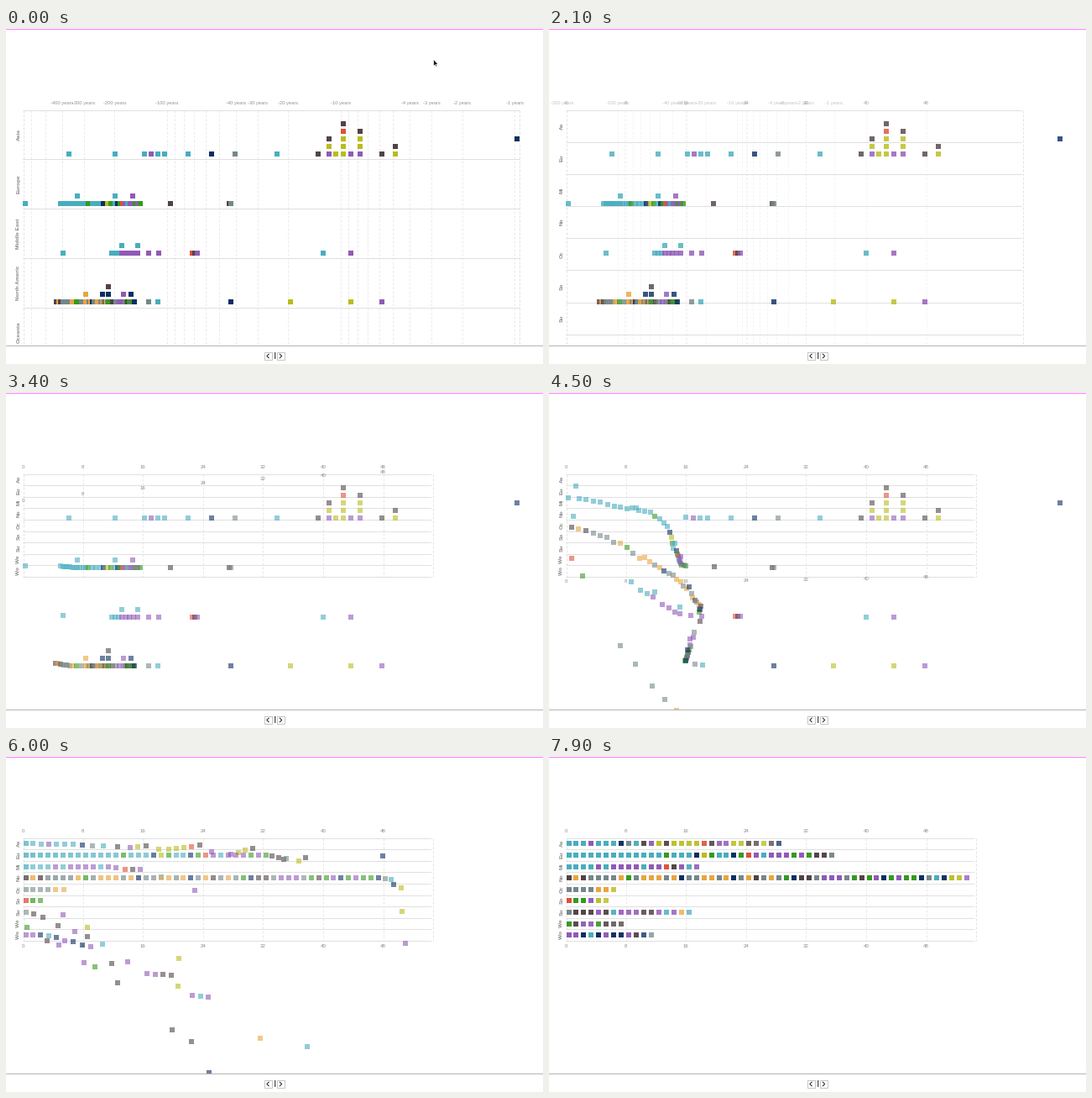
These frames come from a looping animation (640x400 px, 8 s). A matplotlib script:

```python
import matplotlib.pyplot as plt
import numpy as np
from matplotlib.animation import FuncAnimation
from matplotlib.collections import LineCollection
from matplotlib.colors import to_rgb
from matplotlib.patches import Polygon, Rectangle

W, H, DPI = 640, 400, 100
FRAMES, STEP = 80, 100
PX = 72 / DPI

AXIS_START, DUR = 1130, 2000
MOVE_START, SPREAD = 3050, 1975
LEFT, TOP, CLIP = 20, 97.5, 378
OLD_ROW, NEW_ROW = 58.8, 13.6
DECADE, UNIT = 207.2, 8.95

plt.rcParams["font.family"] = "Liberation Sans"

PALETTE = dict(t="#48adbe", p="#9059b8", n="#0b2e62", g="#75878a", d="#514345",
               y="#b9bc1c", o="#e8a53f", r="#e04e39", e="#35991f")

# label, item colours from oldest to newest, key points {item: x on the log axis}
ROWS = [
    ("Asia", "tttptttngtdpydyyyyrdppyyddydn",
     {0: 75, 1: 130, 2: 165, 5: 189, 8: 273, 10: 372, 11: 385, 13: 385, 15: 402,
      19: 402, 21: 422, 24: 422, 26: 464, 27: 464, 28: 609}),
    ("Europe", "t" * 13 + "etttnyettnerptpppepeddg",
     {0: 23, 1: 65, 8: 85, 9: 85, 13: 98, 20: 130, 21: 130, 28: 151, 29: 151,
      32: 160, 33: 196, 34: 266, 35: 268}),
    ("Middle East", "ttttptpppptpprdptp",
     {0: 68, 1: 126, 4: 138, 5: 138, 9: 157, 10: 157, 12: 182, 13: 222, 15: 228,
      16: 378, 17: 411}),
    ("North Americ", "dodggggoegooogonggoogongodgogenddgpppgedepnepeengtnyyp",
     {0: 60, 7: 79, 10: 95, 11: 95, 21: 115, 22: 115, 29: 122, 31: 122, 35: 140,
      36: 140, 41: 149, 42: 149, 47: 153, 48: 170, 49: 181, 50: 268, 52: 411,
      53: 448}),
    ("Oceania", "ggggooy", {0: 121, 2: 138, 5: 163, 6: 435}),
    ("South Americ", "reepyy", {0: 61, 1: 75, 2: 149, 3: 331, 5: 434}),
    ("Sub-Tropics", "gdddpdtpppddptpot",
     {0: 144, 2: 200, 4: 366, 8: 411, 11: 411, 12: 422, 14: 422, 15: 464, 16: 546}),
    ("West Asia", "edppeddd", {0: 185, 1: 325, 3: 385, 5: 402, 7: 434}),
    ("World", "ppntnpnnpdng", {0: 128, 2: 142, 8: 251, 9: 370, 11: 500}),
]


def ease(u):
    """Cubic in-out."""
    u = np.clip(u, 0, 1)
    return np.where(u < .5, 4 * u ** 3, 1 - 4 * (1 - u) ** 3)


def mix(a, b, k):
    return a + (b - a) * k


def log_x(years, right=606):
    return right - DECADE * np.log10(years)


def build_items():
    """Items of equal age stack up; the newest ones sit two levels higher."""
    start, end, rgb = [], [], []
    for row, (_, colors, keys) in enumerate(ROWS):
        xs = np.interp(range(len(colors)), list(keys), list(keys.values()))
        ages = np.round(10 ** ((609 - xs) / DECADE))
        for col, (c, age) in enumerate(zip(colors, ages)):
            level = np.sum(ages[:col] == age) + 2 * (age == 1)
            start.append((log_x(age, 609), 150 + OLD_ROW * row - 9 * level))
            end.append((23.5 + UNIT * col, 104.4 + NEW_ROW * row))
            rgb.append(to_rgb(PALETTE[c]))
    return np.array(start), np.array(end), np.array(rgb)


start, end, rgb = build_items()
rank = np.argsort(np.argsort(start[:, 0], kind="stable"))
delay = MOVE_START + SPREAD * rank / len(start)

fig = plt.figure(figsize=(W / DPI, H / DPI), dpi=DPI, facecolor="white")
ax = fig.add_axes([0, 0, 1, 1])
ax.set(xlim=(0, W), ylim=(H, 0))
ax.axis("off")


def label(x, y, s, size, color, **kw):
    return ax.text(x, y, s, fontsize=size * PX, color=color, ha="center",
                   va="center", clip_on=True, **kw)


def lines(color, style="solid", z=1):
    c = LineCollection([], colors=color, linewidths=PX, linestyles=style, zorder=z)
    ax.add_collection(c)
    return c


def vline(x, y0, y1):
    return [(x, y0), (x, y1)]


def hline(y, x0, x1):
    return [(x0, y), (x1, y)]


DASH = (0, (3, 2))

# log axis that collapses into a linear one
years = np.array([m * d for d in (1, 10, 100) for m in range(1, 10) if m * d <= 600])
old_x = log_x(years)
old_end = 23.5 - .72 * years
old_grid = lines("#ebebeb", DASH)
old_labels = [(i, label(0, 89.5, f"-{v} years", 5.8, "#929292"))
              for i, v in enumerate(years) if str(v)[0] in "1234"]

# linear count axis
counts = np.arange(0, 49, 8)
new_x = LEFT + UNIT * counts
new_grid = lines("#e8e8e8", DASH)
top_labels, low_labels = [
    [label(x, 89.5, str(n), 6.2, "#8c8c8c") for x, n in zip(new_x, counts)]
    for _ in range(2)]

frame_lines = lines("#e3e3e3", DASH)
row_lines = lines("#e0e0e0")
row_labels = [label(15, 0, "", 6.5, "#888888", rotation=90, weight="bold")
              for _ in ROWS]

squares = ax.scatter(start[:, 0], start[:, 1], s=(6 * PX) ** 2, marker="s",
                     linewidths=0, zorder=3)

# footer
ax.add_patch(Rectangle((0, CLIP), W, H - CLIP, fc="white", ec="none", zorder=5))
ax.plot([0, W], [377.5, 377.5], color="#b4b4b4", lw=PX, zorder=6)
for cx, d in ((312, 1), (327.5, -1)):
    ax.add_patch(Rectangle((cx - 4.5, 386), 9, 9, fc="white", ec="#c6c6c6",
                           lw=PX, zorder=6))
    ax.plot([cx + 1.2 * d, cx - 1.2 * d, cx + 1.2 * d], [388.2, 390.5, 392.8],
            color="#222222", lw=PX, zorder=7)
for x, c in ((319.5, "#555555"), (321, "#c0c0c0")):
    ax.plot([x, x], [385.5, 393], color=c, lw=PX, zorder=7)
ax.plot([0, W], [0.5, 0.5], color="#f979f4", lw=PX, zorder=7)

# tops of a text line that peeks in at the lower edge
cut_text = lines("#333333", (0, (2, 1.5)), z=7)
cut_text.set_segments([hline(399.5, a, b) for a, b in
                       ((18, 23), (64, 82), (97, 127), (134, 155), (385, 407))])

arrow = np.array([(0, 0), (0, 7.2), (1.6, 5.8), (2.7, 8.2), (3.7, 7.7),
                  (2.7, 5.4), (4.8, 5.2)])
cursor = ax.add_patch(Polygon(arrow + (509.8, 37.8), fc="#111111", ec="white",
                              lw=.4 * PX, zorder=8))


def draw_axes(t, k):
    row_h = mix(OLD_ROW, NEW_ROW, k)
    bottom = TOP + row_h * len(ROWS)
    right = mix(612, 509, k)

    x = mix(old_x, old_end, k)
    old_grid.set_segments([vline(v, TOP, bottom) for v in x if v >= LEFT])
    old_grid.set_alpha(1 - k)
    for i, txt in old_labels:
        txt.set_x(x[i])
        txt.set_alpha(1 - k)

    new_grid.set_segments([vline(v, TOP, bottom) for v in new_x[1:]])
    new_grid.set_alpha(k)
    for i, (hi, lo) in enumerate(zip(top_labels, low_labels)):
        hi.set_alpha(k)
        lo.set_alpha(k)
        lo.set_y(89.5 + 136.5 * float(ease((t - 2560 - 64 * i) / DUR)))

    ys = TOP + row_h * np.arange(len(ROWS) + 1)
    row_lines.set_segments([hline(y, LEFT, mix(612, 504, k)) for y in ys])
    frame_lines.set_segments([vline(LEFT + .5, TOP, bottom), vline(right, TOP, bottom)]
                             + [hline(y, right - 5, right) for y in ys])
    for i, (txt, (name, _, _)) in enumerate(zip(row_labels, ROWS)):
        txt.set_text(name if t < AXIS_START else name[:2])
        txt.set_y(TOP + row_h * (i + .5))


def update(i):
    t = i * STEP
    k = float(ease((t - AXIS_START) / DUR))
    draw_axes(t, k)

    move = ease((t - delay) / DUR)[:, None]
    squares.set_offsets(mix(start, end, move))
    alpha = 1 - .4 * k + .4 * ease((t - delay - DUR) / DUR)
    squares.set_facecolors(np.column_stack([rgb, np.clip(alpha, 0, 1)]))

    cursor.set_visible(t < 500)
    cut_text.set_visible(900 <= t < 4000)
    return []


anim = FuncAnimation(fig, update, frames=FRAMES, interval=STEP, repeat=True,
                     repeat_delay=0, blit=False)
plt.show()
```
